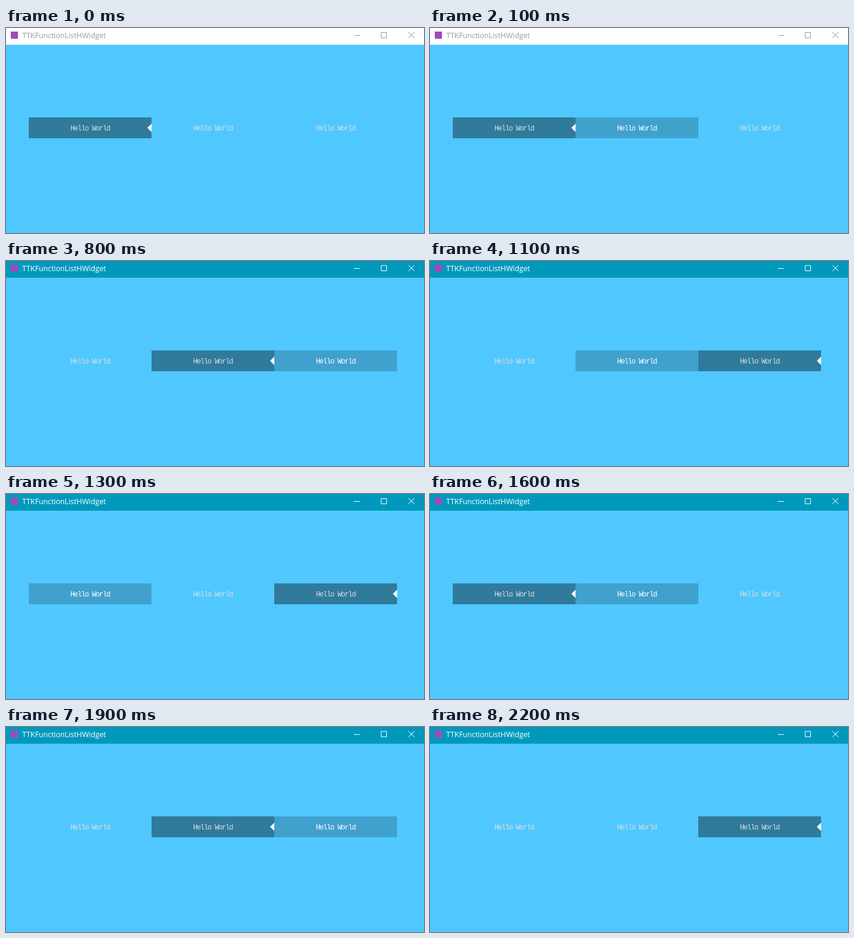
Write an HTML page with a canvas that moves like this. It is 698 px wide and 344 px high and loops after 2.6 s.

```html
<!DOCTYPE html>
<html lang="en">
<head>
<meta charset="utf-8">
<title>TTKFunctionListHWidget</title>
<style>
html, body { margin: 0; width: 100%; height: 100%; overflow: hidden; background: #50c8ff; }
canvas { display: block; }
</style>
</head>
<body>
<canvas id="stage" width="698" height="344"></canvas>
<script>
const ctx = document.getElementById('stage').getContext('2d');
const LOOP = 2600;
const ITEM = { x: 38, y: 150, w: 205, h: 35 };

// start time, selected item, hovered item (-1: none)
const steps = [
  [0, 0, -1],
  [100, 0, 1],
  [600, 1, 1],
  [800, 1, 2],
  [900, 2, 2],
  [1100, 2, 1],
  [1300, 2, 0],
  [1500, 0, 0],
  [1600, 0, 1],
  [1800, 1, 1],
  [1900, 1, 2],
  [2000, 2, 2],
  [2200, 2, -1]
];
const FOCUS_AT = 600;

function rect(color, x, y, w, h) {
  ctx.fillStyle = color;
  ctx.fillRect(x, y, w, h);
}

function text(str, x, y, font, color, spacing) {
  ctx.font = font;
  ctx.letterSpacing = spacing;
  ctx.fillStyle = color;
  ctx.fillText(str, x, y);
}

function titleBar(active) {
  const ink = active ? '#fff' : '#999';
  rect(active ? '#0099bc' : '#fff', 0, 0, 698, 28);
  rect('#a24bb8', 8, 6, 12, 12);
  text('TTKFunctionListHWidget', 27, 17, '12.3px "Open Sans", "Noto Sans", sans-serif', ink, '0px');

  ctx.strokeStyle = ink;
  ctx.lineWidth = 1;
  ctx.beginPath();
  ctx.moveTo(581, 12.5);
  ctx.lineTo(591, 12.5);
  ctx.rect(626.5, 7.5, 9, 9);
  ctx.moveTo(672, 7);
  ctx.lineTo(682, 17);
  ctx.moveTo(682, 7);
  ctx.lineTo(672, 17);
  ctx.stroke();
}

function arrow(right) {
  ctx.fillStyle = '#fff';
  ctx.beginPath();
  ctx.moveTo(right, 160.5);
  ctx.lineTo(right - 7, 167.5);
  ctx.lineTo(right, 174.5);
  ctx.fill();
}

function item(i, selected, hovered) {
  const x = ITEM.x + i * ITEM.w;
  if (selected) rect('#307a9b', x, ITEM.y, ITEM.w, ITEM.h);
  else if (hovered) rect('#40a1cd', x, ITEM.y, ITEM.w, ITEM.h);
  // 7.2px advance tightened to a 6px cell
  text('Hello World', x + 69.4, 172, '12px "Liberation Mono", monospace', hovered ? '#fff' : '#ddd', '-1.2px');
  if (selected) arrow(x + ITEM.w);
}

function draw(t) {
  const [, selected, hovered] = steps.filter(s => s[0] <= t).pop();
  rect('#50c8ff', 0, 0, 698, 344);
  titleBar(t >= FOCUS_AT);
  for (let i = 0; i < 3; i++) item(i, i === selected, i === hovered);
}

const start = performance.now();
function tick() {
  draw((performance.now() - start) % LOOP);
  requestAnimationFrame(tick);
}
tick();
</script>
</body>
</html>
```
